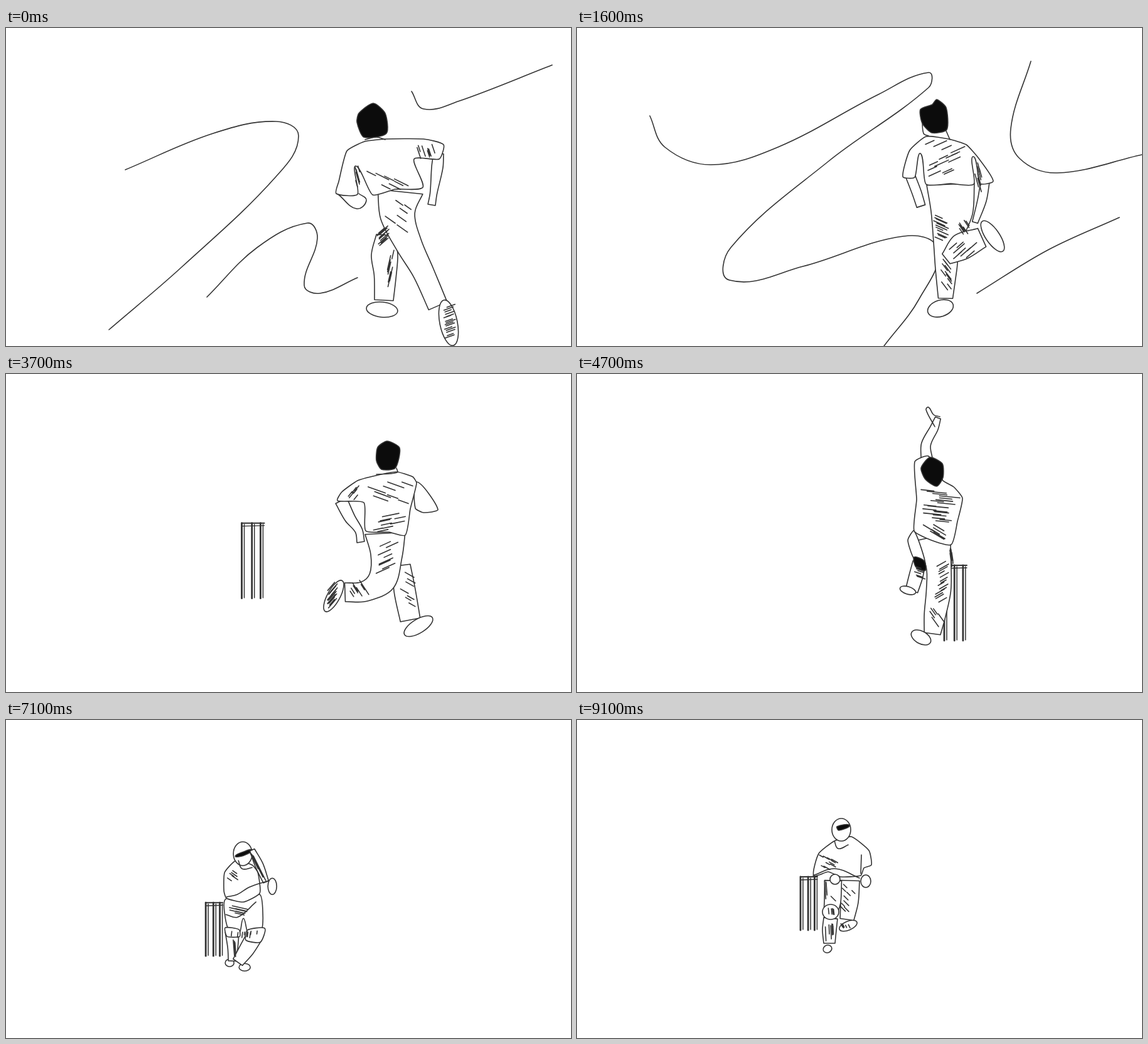
An HTML page with a canvas that plays this animation: 900 px wide and 507 px high, repeating every 9200 ms.

```html
<!DOCTYPE html>
<html lang="en">
<head>
<meta charset="utf-8">
<title>Cricket sketch</title>
<style>
html, body { margin: 0; width: 100%; height: 100%; overflow: hidden; background: #fff; }
canvas { display: block; }
</style>
</head>
<body>
<canvas id="stage" width="900" height="507"></canvas>
<script>
const ctx = document.getElementById('stage').getContext('2d');
const LOOP = 9200, STEP = 100;

// tube: x y width ... | poly, ink, line: x y ... | oval: x y rx ry turn
// hatch: box x y w h, stroke dx dy, count
const toeOff = `tube 689 200 16 687 222 18 681 264 11 678 282 12
line 530 266 558 288 574 275 562 264
tube 605 330 30 603 362 42 604 395 35 602 434 30
oval 599 449 25 12 .1
tube 628 261 72 624 300 55 642 346 42 665 390 34 688 443 32
oval 705 470 14 37 -.2
poly 571 181 543 196 530 245 526 264 560 265 557 220 584 266 620 257 664 254 650 209 690 209 697 186 665 177 605 177
line 572 178 590 174 604 178
ink 585 120 604 136 606 168 570 174 559 150 562 136
hatch 575 228 45 25 20 10 7
hatch 652 185 30 12 5 15 8
hatch 600 270 35 45 17 12 6
hatch 588 325 10 22 14 -12 12
hatch 612 352 6 50 -5 22 8
hatch 696 445 7 50 14 -5 15
hatch 555 218 6 25 4 14 7`;

const kickUp = `tube 650 246 14 645 275 14 634 310 9
tube 531 236 15 541 262 15 548 284 14
tube 595 249 76 597 295 66 589 345 42 588 385 34 587 431 23
oval 579 447 21 13 -.3
tube 588 368 20 612 349 42 645 334 32
oval 662 332 11 29 -.6
poly 556 173 530 195 519 237 538 238 547 200 556 249 595 248 632 249 631 205 642 248 663 244 640 208 620 186 592 177
line 588 164 594 178
line 550 142 552 168 560 172
ink 547 130 566 122 573 114 588 127 589 162 565 167 550 152
hatch 555 185 42 55 20 -9 14
hatch 633 215 8 25 6 22 7
hatch 564 295 12 40 18 8 11
hatch 608 305 12 15 8 12 7
hatch 593 350 32 20 16 -14 8
hatch 573 365 18 45 9 12 10`;

const pushOff = `tube 676 202 20 662 230 17 648 250 12 645 268 12
poly 556 172 522 216 545 221 558 214
tube 580 305 28 575 345 34 566 392 32
oval 553 402 26 11 .55
tube 606 254 64 604 290 50 612 330 44 640 347 32 670 348 30
oval 688 354 10 28 -.5
poly 588 156 562 164 556 174 566 215 574 257 600 252 637 250 640 205 682 202 675 188 650 170 621 162
line 588 150 587 157 620 160
ink 583 118 603 107 618 117 620 138 612 152 590 150
hatch 562 178 45 30 25 -9 9
hatch 570 222 40 28 24 5 9
hatch 583 262 22 50 20 9 8
hatch 605 342 52 14 9 -14 8
hatch 558 318 18 60 14 -8 7
hatch 681 332 6 28 12 14 16
hatch 645 178 15 15 8 10 6`;

const release = `tube 557 134 18 556 112 15 569 86 13 575 70 9
line 570 84 556 57 560 53 568 65 578 68
tube 545 300 20 540 322 22 533 346 20
oval 527 345 13 6 .3
tube 566 260 58 576 305 40 576 345 39 570 385 34 566 414 26
oval 548 420 17 10 .5
poly 537 250 527 265 536 293 555 305
poly 560 131 538 140 541 200 537 250 562 264 596 272 606 235 614 198 600 180 583 170
ink 548 150 562 133 582 143 583 165 573 179 555 168
ink 537 292 553 298 555 313 540 308
hatch 548 184 30 52 30 3 18
hatch 548 238 30 15 20 12 6
hatch 570 305 10 60 14 -8 14
hatch 562 370 15 20 10 14 5
hatch 536 306 8 18 12 4 6
hatch 592 278 5 8 3 20 7`;

const crouch = `tube 121 147 8 124 172 11 128 198 7
tube 172 255 20 187 275 22 194 290 22
oval 190 293 16 6 -.4
oval 151 302 9 12 .2
tube 173 246 24 168 268 25 163 291 26
poly 128 160 135 188 137 200 160 225 172 222 190 246 208 225 211 198 200 184 172 161 156 158
oval 178 234 14 14 0
oval 127 209 9 7 0
tube 120 227 13 138 221 14 158 205 14
oval 144 151 15 19 0
ink 130 154 141 149 156 150 135 157
line 173 221 181 208 203 187
line 137 206 151 194 162 200
hatch 119 150 4 15 4 28 5
hatch 145 170 15 22 9 -9 8
hatch 158 252 20 8 -5 26 8
hatch 178 265 10 10 11 16 7
hatch 170 232 13 5 4 -7 5
hatch 184 180 8 28 7 7 6`;

const swing = `oval 398 399 7 6 0
oval 422 406 9 6 0
tube 402 350 22 403 375 16 402 396 12
tube 438 356 26 425 378 24 411 398 18
poly 391 298 395 343 414 350 420 328 427 350 449 345 451 322 446 290
poly 391 343 413 346 414 357 394 357
poly 426 347 454 344 447 366 424 363
poly 408 236 390 255 389 285 393 296 420 302 446 288 443 255 434 243
oval 419 225 15 19 0
ink 407 229 420 222 434 219 420 228
tube 434 219 8 445 243 13 456 270 9
oval 466 277 7 13 0
line 393 294 410 290 430 278 460 268
line 412 236 418 249 434 247
line 392 322 411 326 440 302
hatch 431 224 5 5 18 36 4
hatch 393 250 10 15 10 7 5
hatch 396 308 18 12 22 5 7
hatch 396 348 46 3 -1 8 10
hatch 398 362 9 5 2 26 5`;

const stride = `oval 399 365 7 6 -.4
oval 432 328 15 7 -.4
tube 435 256 30 434 290 28 430 318 22
tube 408 256 27 407 290 26 404 306 22
tube 404 316 22 402 335 22 402 356 18
oval 404 306 13 12 0
poly 410 193 385 213 377 248 400 242 420 250 452 248 457 236 469 231 465 208 437 186
oval 460 257 8 10 0
oval 411 254 8 8 0
oval 421 175 15 18 0
ink 414 170 434 168 417 176
line 376 248 411 237 450 252
line 410 193 416 205 432 199
line 453 215 452 245
hatch 386 215 20 20 9 5 10
hatch 394 255 4 8 2 26 4
hatch 400 262 38 38 8 8 10
hatch 395 300 16 2 1 9 5
hatch 394 324 14 6 1 22 6
hatch 420 324 20 4 3 6 5`;

const sweepA = `line 190 226 330 168 430 149 466 172 430 237 280 381 164 481
line 320 429 400 350 480 311 496 335 475 410 500 423 560 398
line 646 101 665 129 720 117 870 59`;

const sweepB = `line 116 140 140 190 213 218 320 190 480 106 560 71 560 95 400 213 245 350 243 402 360 380 520 332 574 352 545 432 489 507
line 723 53 691 160 705 208 765 231 900 202
line 637 423 750 354 864 302`;

const sweepC = `line 208 46 138 124 155 158 300 123 370 121 376 165 300 275 255 340 280 343 390 301 437 325 434 387
line 681 31 655 105 685 161 780 160 900 103
line 715 206 765 217 785 250 820 270 830 305 900 312`;

// Motion keys: [time, x, y]
const bowlEnd = [[2100, -12, 129], [2800, 185, 177], [4700, 583, 305], [5000, 740, 364], [5300, 905, 400]];
const follow = [[4700, 0, 0], [5000, 70, 40], [5300, 260, 60]];
const batEnd = [[5400, -160, 170], [6100, 60, 202], [6400, 28, 202], [7000, 312, 290], [8100, 358, 303], [9100, 354, 250]];
const ballPath = [[4800, 565, 66], [5300, 600, 150], [6100, 420.5, 258.5], [6500, 185, 262], [7000, 795, 170]];

// Running order, "-" means mirrored
const run = [toeOff, pushOff, pushOff, kickUp, '-' + toeOff, '-' + pushOff, '-' + kickUp,
  toeOff, pushOff, kickUp, '-' + toeOff, '-' + pushOff, '-' + kickUp];

function along(keys, t) {
  let i = 1;
  while (i < keys.length - 1 && t > keys[i][0]) i++;
  const [t0, x0, y0] = keys[i - 1], [t1, x1, y1] = keys[i];
  const u = Math.max(0, Math.min(1, (t - t0) / (t1 - t0)));
  return [x0 + (x1 - x0) * u, y0 + (y1 - y0) * u];
}

const dist = (a, b) => Math.hypot(b[0] - a[0], b[1] - a[1]) || 1;

function group(list, n) {
  const out = [];
  for (let i = 0; i < list.length; i += n) out.push(list.slice(i, i + n));
  return out;
}

// Adds a smooth curve through the points to the current path
function edge(pts, closed, bend) {
  const n = pts.length;
  const at = i => closed ? pts[(i + n) % n] : pts[Math.max(0, Math.min(n - 1, i))];
  ctx.lineTo(...pts[0]);
  for (let i = 0; i < (closed ? n : n - 1); i++) {
    const a = at(i - 1), b = at(i), c = at(i + 1), d = at(i + 2);
    const k = dist(b, c) * bend, p = k / dist(a, c), q = k / dist(b, d);
    ctx.bezierCurveTo(b[0] + (c[0] - a[0]) * p, b[1] + (c[1] - a[1]) * p,
      c[0] - (d[0] - b[0]) * q, c[1] - (d[1] - b[1]) * q, ...c);
  }
}

function paint(fill) {
  ctx.fillStyle = fill;
  ctx.fill();
  ctx.stroke();
}

let seed = 1;
function random() {
  seed = seed * 16807 % 2147483647;
  return seed / 2147483647;
}

const tools = {
  line(v) { edge(group(v, 2), false, .36); ctx.stroke(); },
  poly(v) { edge(group(v, 2), true, .16); paint('#fff'); },
  ink(v) { edge(group(v, 2), true, .2); paint('#0c0c0c'); },
  oval([x, y, rx, ry, turn]) { ctx.ellipse(x, y, rx, ry, turn, 0, 7); paint('#fff'); },
  tube(v) {
    const mid = group(v, 3);
    const side = s => mid.map(([x, y, w], i) => {
      const a = mid[Math.max(0, i - 1)], b = mid[Math.min(mid.length - 1, i + 1)];
      const k = s * w / 2 / dist(a, b);
      return [x - (b[1] - a[1]) * k, y + (b[0] - a[0]) * k];
    });
    edge(side(1), false, .33);
    edge(side(-1).reverse(), false, .33);
    ctx.closePath();
    paint('#fff');
  },
  hatch([x, y, w, h, dx, dy, n]) {
    for (let i = 0; i < n; i++) {
      const px = x + w * random(), py = y + h * (i + random()) / n, k = .6 + .5 * random();
      ctx.moveTo(px, py);
      ctx.lineTo(px + dx * k, py + dy * k);
    }
    ctx.stroke();
  }
};

function sketch(text, dx = 0, dy = 0) {
  const flip = text[0] === '-';
  seed = 77;
  ctx.save();
  ctx.translate(dx, dy);
  if (flip) { ctx.translate(1210, 0); ctx.scale(-1, 1); }
  ctx.lineWidth = 1.6;
  for (const row of text.slice(flip ? 1 : 0).split('\n')) {
    const [tool, ...v] = row.split(' ');
    ctx.beginPath();
    tools[tool](v.map(Number));
  }
  ctx.restore();
}

function line(x, y, dx, dy, width) {
  ctx.lineWidth = width;
  ctx.beginPath();
  ctx.moveTo(x, y);
  ctx.lineTo(x + dx, y + dy);
  ctx.stroke();
}

function stumps([x, y], w, h) {
  for (const k of [0, .45, .83]) {
    line(x + 2 + k * w, y, 0, h, 2.8);
    line(x + 6 + k * w, y + 2, 0, h - 3, 1.5);
  }
  line(x + 2, y, w, 0, 2);
  line(x + 2, y + 5, w, -1, 1.4);
}

function dot(x, y, r, color) {
  ctx.fillStyle = color;
  ctx.beginPath();
  ctx.arc(x, y, r, 0, 7);
  ctx.fill();
}

function ball([x, y]) {
  dot(x, y, 7, '#222');
  dot(x + 1.5, y - .5, 4, '#fff');
  line(x - 2, y - 3, 1, 6, 2);
}

function bowler(t) {
  if (t <= 4200) sketch(run[t / STEP % run.length]);
  else sketch(t > 4400 && t <= 4800 ? release : pushOff, ...along(follow, t));
}

function batter(t) {
  const [x, y] = along(batEnd, t);
  const [pose, x0, y0] = t < 6500 ? [crouch, 60, 202] : t < 8600 ? [swing, 358, 303] : [stride, 354, 250];
  stumps([x, y], 27, 85);
  sketch(pose, x - x0, y - y0);
}

function trail(text, t, from, to, home) {
  if (t >= from && t <= to) sketch(text, (t - home) * .14, (t - home) * .04);
}

function draw(now) {
  const t = Math.floor(now % LOOP / STEP) * STEP;
  ctx.fillStyle = '#fff';
  ctx.fillRect(0, 0, 900, 507);
  ctx.strokeStyle = '#333';
  ctx.lineCap = ctx.lineJoin = 'round';
  trail(sweepA, t, 0, 1400, 0);
  trail(sweepB, t, 1500, 2000, 1600);
  trail(sweepC, t, 2100, 2900, 2800);
  if (t >= 2100 && t < 5300) stumps(along(bowlEnd, t), 36, 120);
  if (t < 5300) bowler(t);
  if (t >= 5400) batter(t);
  if (t >= 4800 && t <= 7000) ball(along(ballPath, t));
}

const start = performance.now();
function tick() {
  draw(performance.now() - start);
  requestAnimationFrame(tick);
}
tick();
</script>
</body>
</html>
```
